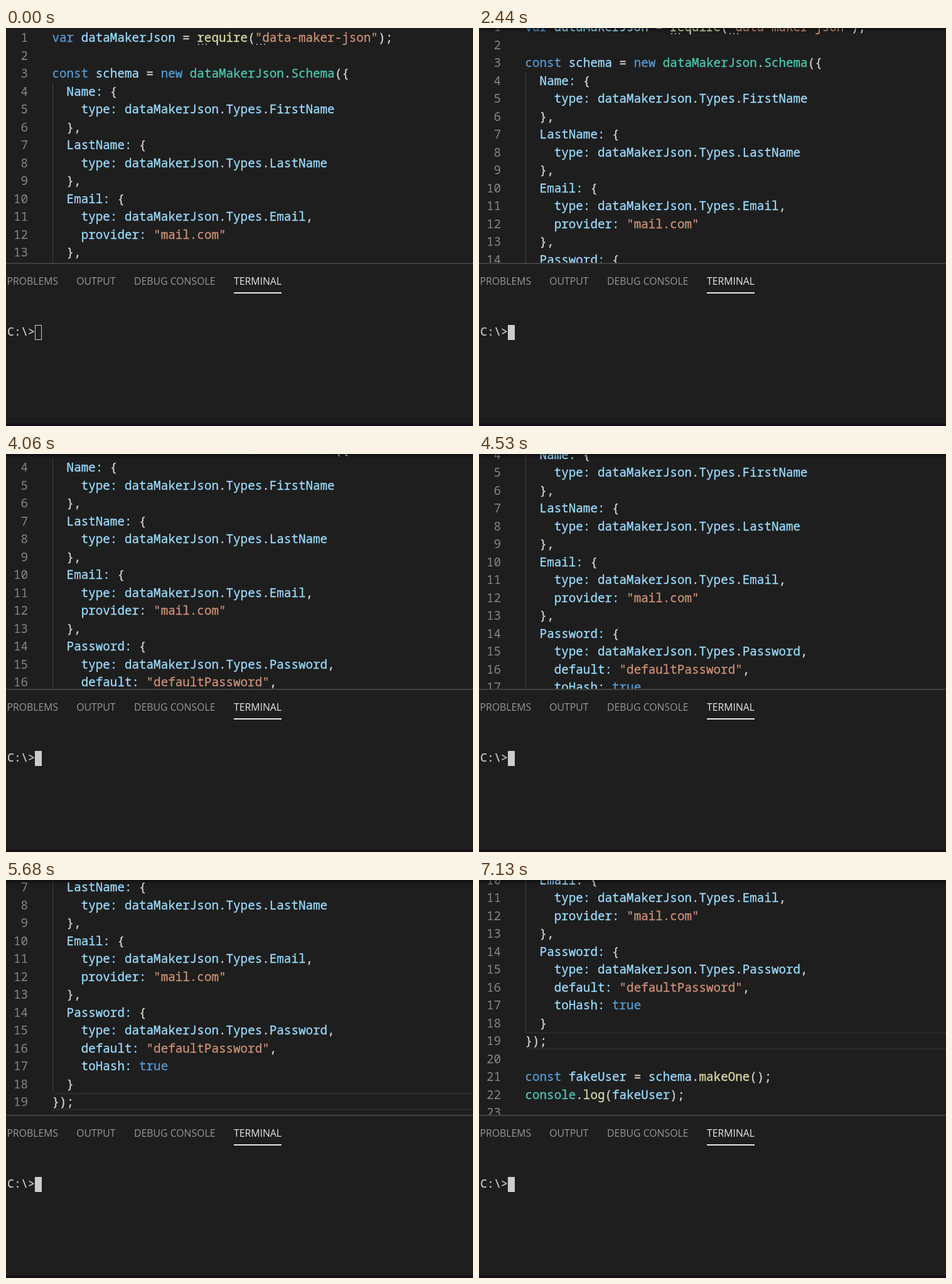
These frames come from a looping animation (744x634 px, 8000 ms). An HTML page:

```html
<!DOCTYPE html>
<html lang="en">
<head>
<meta charset="utf-8">
<title>Editor scroll</title>
<style>
html, body { margin: 0; width: 100%; height: 100%; overflow: hidden; background: #1e1e1e; }
body * { position: absolute; box-sizing: border-box; white-space: pre; margin: 0; }
pre span { position: static; }
#editor { left: 0; top: 0; width: 744px; height: 374px; overflow: hidden; }
#doc { left: 0; top: 0; width: 744px; }
pre { top: 1.25px; font: 19.24px/28.5px "Noto Sans Mono", monospace; }
#code, #prompt { -webkit-text-stroke: .3px; }
#nums { left: 12px; color: #858585; }
#code { left: 73.5px; color: #d4d4d4; }
.string { color: #ce9178; }
.keyword { color: #569cd6; }
.type { color: #4ec9b0; }
.func { color: #dcdcaa; }
.name { color: #9cdcfe; }
#guide { left: 74px; top: 86.5px; width: 1px; height: 427.5px; background: #404040; }
#current { left: 75px; top: 514px; width: 669px; height: 28px; border: solid #282828; border-width: 3px 0; }
.hint { top: 25px; width: 2px; height: 2px; background: #999; box-shadow: 6px 0 #999, 12px 0 #999; }
#shadow { left: 0; top: 0; width: 744px; height: 374px; box-shadow: inset 0 9px 9px -9px #000; }
#border { left: 0; top: 374px; width: 744px; height: 2px; background: #404040; }
.tab { top: 391px; font: 15.8px/24px "Open Sans", sans-serif; color: #979797; }
.active { color: #e7e7e7; }
#underline { left: 363px; top: 421px; width: 76px; height: 2px; background: #e7e7e7; }
#prompt { left: 2px; top: 471px; font: 18.33px/24px "Noto Sans Mono", monospace; color: #ccc; }
#cursor { left: 46px; top: 473px; width: 11px; height: 24px; border: 1px solid #ccc; }
#status { left: 0; top: 630px; width: 744px; height: 4px; background: #170f17; }
</style>
</head>
<body>
<div id="editor">
  <div id="doc">
    <div id="current"></div>
    <div id="guide"></div>
    <pre id="nums"></pre>
    <pre id="code">var dataMakerJson = require("data-maker-json");

const schema = new dataMakerJson.Schema({
  Name: {
    type: dataMakerJson.Types.FirstName
  },
  LastName: {
    type: dataMakerJson.Types.LastName
  },
  Email: {
    type: dataMakerJson.Types.Email,
    provider: "mail.com"
  },
  Password: {
    type: dataMakerJson.Types.Password,
    default: "defaultPassword",
    toHash: true
  }
});

const fakeUser = schema.makeOne();
console.log(fakeUser);
</pre>
    <div class="hint" style="left:306px"></div>
    <div class="hint" style="left:399px"></div>
  </div>
  <div id="shadow"></div>
</div>
<div id="border"></div>
<div class="tab" style="left:1.5px">PROBLEMS</div>
<div class="tab" style="left:112.3px">OUTPUT</div>
<div class="tab" style="left:204px">DEBUG CONSOLE</div>
<div class="tab active" style="left:363px">TERMINAL</div>
<div id="underline"></div>
<div id="prompt">C:\&gt;</div>
<div id="cursor"></div>
<div id="status"></div>
<script>
const $ = id => document.getElementById(id);
const LOOP = 8000;

const token = /(?<string>"[^"]*")|(?<keyword>\b(?:var|const|new|true)\b)|(?<type>\b(?:console|Schema|dataMakerJson(?=\.Schema))\b)|(?<func>\b(?:require|makeOne|log)\b)|(?<name>\w+:?)/g;
$('code').innerHTML = $('code').textContent.replace(token, (text, ...rest) => {
  const groups = rest.at(-1);
  const kind = Object.keys(groups).find(k => groups[k]);
  return `<span class="${kind}">${text}</span>`;
});
$('nums').textContent = Array.from({ length: 23 }, (_, i) => `${i + 1}`.padStart(2)).join('\n');

// Each stretch ends at a scroll offset, reached in equal steps: [first time, last time, count]
const stretches = [
  [17, [2060, 2060, 1], [2260, 2300, 2], [2440, 2440, 1]],
  [41, [2620, 2670, 2], [3000, 3240, 4]],
  [79.5, [3370, 3370, 1], [3550, 3830, 6], [3980, 4060, 2]],
  [136, [4160, 4210, 2], [4390, 5050, 9]],
  [219, [5150, 5150, 1], [5210, 5920, 11], [6050, 6300, 5]],
  [272, [6340, 6850, 8], [6950, 7130, 3]],
];
const spread = ([from, to, n]) =>
  Array.from({ length: n }, (_, i) => from + (n > 1 ? (to - from) * i / (n - 1) : 0));

const steps = [];
let start = 0;
for (const [end, ...bursts] of stretches) {
  const times = bursts.flatMap(spread);
  times.forEach((time, i) =>
    steps.push({ time, offset: start + (end - start) * (i + 1) / times.length }));
  start = end;
}

function draw(now) {
  const t = now % LOOP;
  const offset = steps.findLast(s => s.time <= t + .01)?.offset ?? 0;
  $('doc').style.top = `${-offset}px`;
  $('shadow').hidden = !offset;
  $('cursor').style.background = t < 1170 ? 'none' : '#ccc';
}

const origin = performance.now();
function tick() {
  draw(performance.now() - origin);
  requestAnimationFrame(tick);
}
tick();
</script>
</body>
</html>
```
